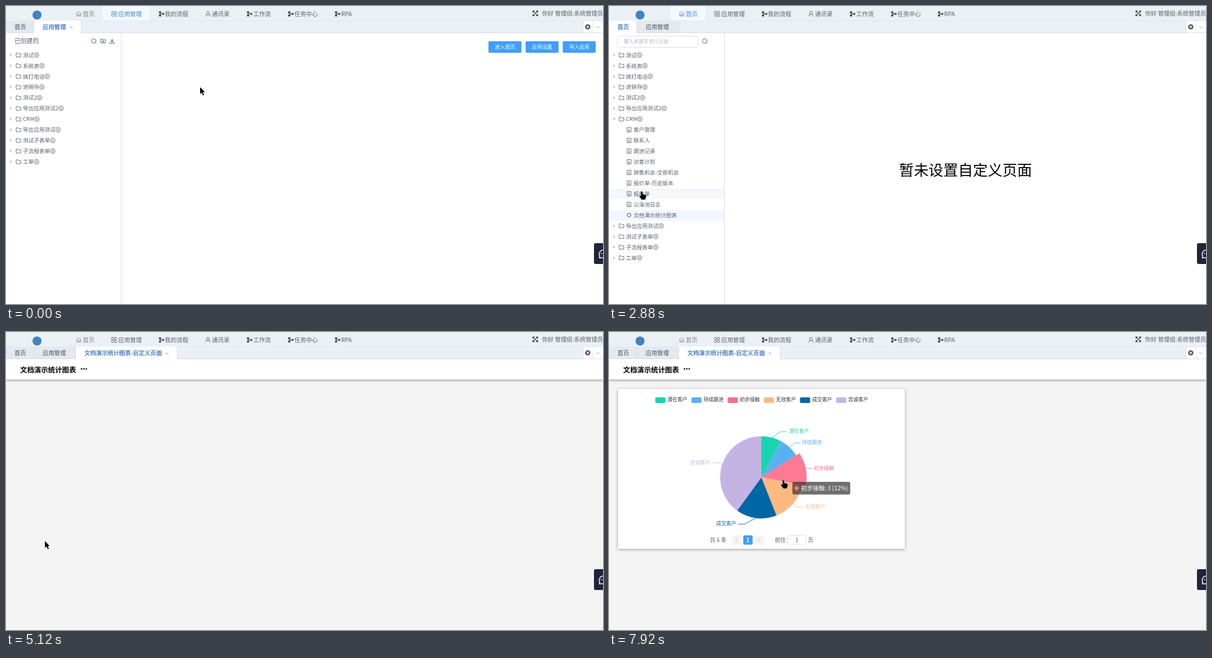
An HTML page with a canvas for the animation above (8 s loop, 1058x529 px).

```html
<!DOCTYPE html>
<html lang="zh">
<head>
<meta charset="utf-8">
<style>
html, body { margin: 0; width: 100%; height: 100%; overflow: hidden; }
canvas { display: block; }
</style>
</head>
<body>
<canvas width="1058" height="529"></canvas>
<script>
const ctx = document.querySelector('canvas').getContext('2d');
const LOOP = 8000, TAB_CLICK = 1510, HOME = 1810, BLANK = 4800, PAGE = 5000, CHART = 5240, TIP = 6380;
const BLUE = '#3a84f0', GREY = '#5c6068', BAR = '#ebf0f7', EDGE = '#d5dbe4', PRIMARY = '#409eff';

const ICON = {
  home: 'M-4.5 0L0-4.2 4.5 0M-3.3-.8V4h2.2V1.2h2.2V4h2.2V-.8',
  apps: [[-2.6, -2.6], [2.6, -2.6], [-2.6, 2.6], [2.6, 2.6]].map(([x, y]) => ring(x, y, 2.1)).join(''),
  flow: 'M-4.5-4.5h4v3.2h-4zM-4.5 1.3h4v3.2h-4zM1-1.6h4v3.2h-4zM-3-1.5h1v3h-1zM-2-.5h3v1h-3z',
  user: ring(0, -1.8, 2.6) + 'M-4.2 4.5q.2-3.8 4.2-3.8t4.2 3.8',
  folder: 'M-4-3.5h3l1.2 1.3h4v5.7h-8.2z',
  gear: 'M-2.3-4h4.6l2.3 4-2.3 4h-4.6l-2.3-4z' + ring(0, 0, 2),
  doc: 'M-3.5-4h7v8h-7zM-1.5-1.5h2M-1.5.5h3M-1.5 2.3h3',
  chip: 'M-2.8-2.8h5.6v5.6h-5.6zM-4.2 0h1.4M2.8 0h1.4M0-4.2v1.4M0 2.8v1.4',
  search: ring(0, 0, 4) + 'M2.8 2.8l1.8 1.8',
  plus: 'M-2 .8h4M0-1.2v4',
  download: 'M0-4.5v6M-2.5-1L0 1.5 2.5-1M-4 2v2h8v-2',
  expand: 'M-4-4L4 4M4-4L-4 4M-4.2-1.5v-2.7h2.7M4.2-1.5v-2.7h-2.7M-4.2 1.5v2.7h2.7M4.2 1.5v2.7h-2.7',
  cross: 'M-2-2l4 4M2-2l-4 4',
  right: 'M-1.5-3l3.3 3-3.3 3z',
  down: 'M-3-1.5l3 3.3 3-3.3z',
  arrow: 'M0 0V12.2L2.8 9.6 5 14.6 7 13.7 4.9 8.9H8.4Z',
  hand: 'M-1.5 1Q0-1 1.5 1V5l4.5 1q2 .5 1.8 2.5l-.6 3-1.2 3.3h-6.5l-1-2-2.6-3.6q-.8-2 .8-2l1.8 1.3z'
};

const menu = [
  ['home', 129, 136, '首页'], ['apps', 191.5, 199, '应用管理'], ['flow', 275.5, 281.5, '我的流程'],
  ['user', 358, 365, '通讯录'], ['flow', 431.5, 438, '工作流'], ['flow', 504.5, 511, '任务中心'], ['flow', 587.5, 594, 'RPA']
];
const apps = ['测试', '系统表', '拨打电话', '进销存', '测试2', '导出应用测试2', 'CRM', '导出应用测试', '测试子表单', '子流程表单', '工单'];
const crmPages = ['客户管理', '联系人', '跟进记录', '访客计划', '销售机会-全部机会', '报价单-历史版本', '报价单', '公海池日志', '文档演示统计图表'];

// name, value, colour, label line, label x
const slices = [
  ['潜在客户', 2, '#19d4ae', 'M288 188L304 177H315', 319],
  ['持续跟进', 2, '#5ab1ef', 'M320 205L328 197H339', 342],
  ['初步接触', 3, '#fa6e86', 'M341 244.5L349 242H360', 363],
  ['无效客户', 4, '#ffb980', 'M326 304L334 311H345', 348],
  ['成交客户', 4, '#0067a6', 'M261 330L240 341H229', 190],
  ['忠诚客户', 10, '#c4b4e4', 'M201 235.5L194 232H183', 144]
];
const labelY = [176, 196, 242, 310, 340, 232];
const TOTAL = 25, CX = 270, CY = 258, R = 73, TAU = Math.PI * 2;

// time, x, y of the pointer tip
const track = [
  [430, 344, 144], [1210, 18, 43], [1300, 20, 42], [1850, 20, 42], [2610, 72, 350], [2880, 58, 329],
  [3150, 130, 280], [3420, 72, 212], [3500, 71, 202], [3800, 71, 202], [4410, 69, 371], [5810, 69, 371],
  [6450, 228, 241], [6520, 228, 241], [6860, 262, 224], [6950, 262, 224], [7310, 295, 225], [7570, 309, 263]
];

function ring(x, y, r) {
  return `M${x + r} ${y}a${r} ${r} 0 1 1 ${-2 * r} 0a${r} ${r} 0 1 1 ${2 * r} 0`;
}
function ramp(t, from, to) {
  return Math.min(1, Math.max(0, (t - from) / (to - from)));
}
function pointerAt(t) {
  const i = track.findIndex(k => k[0] > t);
  if (i === 0) return track[0].slice(1);
  if (i < 0) return track[track.length - 1].slice(1);
  const [t0, x0, y0] = track[i - 1], [t1, x1, y1] = track[i];
  let k = ramp(t, t0, t1);
  k = k * k * (3 - 2 * k);
  return [x0 + (x1 - x0) * k, y0 + (y1 - y0) * k];
}
function sliceAt(t) {
  const [x, y] = pointerAt(t), dx = x - CX, dy = y - CY;
  if (t < CHART || Math.hypot(dx, dy) > R) return -1;
  let rest = (Math.atan2(dx, -dy) / TAU + 1) % 1 * TOTAL;
  return slices.findIndex(s => (rest -= s[1]) < 0);
}

function rect(x, y, w, h, color) {
  ctx.fillStyle = color;
  ctx.fillRect(x, y, w, h);
}
function box(x, y, w, h, r, fill, stroke) {
  ctx.beginPath();
  ctx.roundRect(x, y, w, h, r);
  if (fill) { ctx.fillStyle = fill; ctx.fill(); }
  if (stroke) { ctx.strokeStyle = stroke; ctx.lineWidth = 1; ctx.stroke(); }
}
function text(s, x, y, size, color = GREY, align = 'left', weight = 400) {
  ctx.font = `${weight} ${size}px "Noto Sans CJK SC", "Noto Sans CJK", sans-serif`;
  ctx.textAlign = align;
  ctx.fillStyle = color;
  ctx.fillText(s, x, y + size * .38);
  return ctx.measureText(s).width;
}
function shape(d, x, y, stroke, fill, width = .9) {
  const path = new Path2D(d);
  ctx.save();
  ctx.translate(x, y);
  ctx.lineWidth = width;
  if (stroke) { ctx.strokeStyle = stroke; ctx.stroke(path); }
  if (fill) { ctx.fillStyle = fill; ctx.fill(path); }
  ctx.restore();
}
function shadowed(blur, dy, draw) {
  ctx.save();
  ctx.shadowColor = 'rgba(0,0,0,.4)';
  ctx.shadowBlur = blur;
  ctx.shadowOffsetY = dy;
  draw();
  ctx.restore();
}
function faded(alpha, draw) {
  ctx.save();
  ctx.globalAlpha = alpha;
  draw();
  ctx.restore();
}

function drawTab(x, w, label, on, blue, cross) {
  rect(x, 26, w, 21, '#e4e9ef');
  faded(on, () => rect(x, 26, w, 22, '#fff'));
  rect(x + w - 1, 26, 1, 22, EDGE);
  text(label, x + 15, 37, 10.3, '#495060');
  faded(blue, () => text(label, x + 15, 37, 10.3, BLUE));
  if (cross > 0) faded(cross, () => shape(ICON.cross, x + w - 18.5, 38, '#6ba0ee', null, .8));
}

function drawHeader(t) {
  rect(0, 0, 1058, 48, BAR);
  shape(ring(0, 0, 8), 55, 16, null, '#4284bf');
  const active = t < HOME ? 1 : t < BLANK ? 0 : -1;
  if (active === 1) rect(171, 0, 84, 26, '#f5f8fc');
  if (active === 0) rect(109, 0, 62, 26, '#f5f8fc');
  menu.forEach(([icon, ix, x, label], i) => {
    const color = i === active ? BLUE : i ? GREY : '#7d8188';
    const solid = icon === 'flow';
    shape(ICON[icon], ix, 14, solid ? null : color, solid ? '#484c54' : null);
    text(label, x, 14, 10.4, color);
  });
  shape(ICON.expand, 938, 13, '#484c54', null, 1.4);
  text('你好 管理组:系统管理员', 950, 13, 10.3);

  rect(0, 26, 1058, 1, '#e3e8ef');
  rect(0, 47, 1058, 1, EDGE);
  const page = t >= PAGE;
  const bg = ramp(t, TAB_CLICK, 1700), blue = ramp(t, HOME + 20, 2080);
  drawTab(0, 50, '首页', page ? 0 : bg, page ? 0 : blue, 0);
  drawTab(50, 84 - 10 * blue, '应用管理', 1 - bg, 1 - blue, 1 - blue);
  if (page) drawTab(124, 180, '文档演示统计图表-自定义页面', 1, 1, 1);

  rect(1022, 27, 36, 20, '#fff');
  rect(1022, 27, 1, 20, EDGE);
  rect(1040, 27, 1, 20, '#e3e7ed');
  shape(ring(0, 0, 4.6), 1031, 37, null, '#484c54');
  shape(ICON.cross, 1031, 37, '#fff', null, 1.2);
  shape('M-3-1.5l3 3 3-3', 1049, 37.5, '#9a9ea6');
}

function drawTree(t) {
  const home = t >= HOME, [px, py] = pointerAt(t);
  const rows = apps.flatMap(name => home && name === 'CRM' ? [[name], ...crmPages.map(p => [p, true])] : [[name]]);
  let hover = px < 204 ? Math.floor((py - 77.5) / 18.95) : -1;
  if (hover >= rows.length) hover = -1;
  rows.forEach(([name, child], i) => {
    const y = 87 + 18.95 * i, last = name === crmPages[8];
    if (last) rect(0, Math.round(y - 9.5), 204, 19, '#f0f7ff');
    else if (i === hover) rect(0, Math.round(y - 9.5), 204, 19, '#f5f7fa');
    if (child) {
      shape(last ? ICON.chip : ICON.doc, 35.5, y, GREY);
      text(name, 43.5, y, 9.6);
    } else {
      shape(home && name === 'CRM' ? ICON.down : ICON.right, 9, y, null, '#b9bec8');
      shape(ICON.folder, 22, y, GREY);
      const w = text(name, 30, y, 9.6);
      shape(ICON.gear, 34.8 + w, y, GREY, null, .8);
    }
  });
  return hover;
}

function drawManager(t) {
  rect(0, 48, 1058, 481, '#fff');
  rect(204, 48, 1, 481, '#d9dde3');
  if (t < HOME) {
    text('已创建的', 15, 62, 10.8);
    shape(ICON.search, 155.5, 62, GREY, null, 1);
    shape(ICON.folder, 172, 62, GREY, null, 1);
    shape(ICON.plus, 172, 62, GREY, null, 1);
    shape(ICON.download, 188, 62.5, GREY, null, 1.1);
    ['进入首页', '应用设置', '导入应用'].forEach((label, i) => {
      const x = 855 + 65.8 * i;
      box(x, 62.5, 58.5, 20.5, 2, PRIMARY);
      text(label, x + 29.3, 72.5, 9, '#fff', 'center');
    });
  } else {
    box(14.5, 53.5, 143, 20, 3, '#fff', '#dcdfe6');
    text('输入关键字进行过滤', 26, 63, 8.8, '#b4b8c0');
    shape(ICON.search, 169.5, 62, GREY, null, 1);
    text('暂未设置自定义页面', 514, 291, 26.2, '#000');
  }
  return drawTree(t);
}

function lighten(hex) {
  const channels = hex.match(/\w\w/g).map(c => Math.min(255, Math.round(parseInt(c, 16) * 1.1)));
  return `rgb(${channels})`;
}

function drawPie(t, hovered) {
  const k = ramp(t, CHART, CHART + 1000), sweep = 1 - (1 - k) ** 3;
  slices.forEach(([name, , color, line, x], i) => {
    shape(line, 0, 0, color);
    text(name, x, labelY[i], 8.9, color);
  });
  let start = 0;
  slices.forEach(([, value, color], i) => {
    const end = Math.min(start + value / TOTAL, sweep);
    // the raised radius eases over the last moments of hovering
    const lift = [0, 40, 80, 120].filter(d => sliceAt(t - d) === i).length / 4;
    if (end > start) {
      ctx.beginPath();
      ctx.moveTo(CX, CY);
      ctx.arc(CX, CY, R + 7 * lift, start * TAU - TAU / 4, end * TAU - TAU / 4);
      ctx.fillStyle = i === hovered ? lighten(color) : color;
      ctx.fill();
    }
    start += value / TOTAL;
  });
}

function drawPager() {
  text('共 6 条', 179, 369, 9.7);
  [[218, 1], [258.5, -1]].forEach(([x, dir]) => {
    box(x, 361, 16.5, 16.5, 1.5, '#f4f4f5');
    shape(`M${1.5 * dir}-3L${-1.5 * dir} 0 ${1.5 * dir} 3`, x + 8, 369.2, '#b4b8c0');
  });
  box(238, 361, 16.5, 16.5, 1.5, PRIMARY);
  text('1', 246.2, 369.2, 9.7, '#fff', 'center', 700);
  text('前往', 294, 369, 9.7);
  box(316.5, 361.5, 33, 15.5, 2, '#fff', '#dcdfe6');
  text('1', 333, 369.2, 9.7, GREY, 'center');
  text('页', 352.5, 369, 9.7);
}

function drawTooltip(t, hovered) {
  const [x, y] = pointerAt(Math.max(TIP, t - 350)).map((v, i) => v + [16, 3][i]);
  const [name, value, color] = slices[hovered];
  const label = `${name}: ${value} (${value * 100 / TOTAL}%)`;
  ctx.font = '400 10.4px "Noto Sans CJK SC", "Noto Sans CJK", sans-serif';
  box(x, y, ctx.measureText(label).width + 19.5, 22.5, 3, 'rgba(50,50,50,.7)');
  shape(ring(0, 0, 3.7), x + 7.5, y + 11.3, null, color);
  text(label, x + 15.5, y + 11.3, 10.4, '#fff');
}

function drawPage(t, hovered) {
  rect(0, 48, 1058, 481, '#f4f4f4');
  shadowed(4, 1.5, () => rect(0, 48, 1058, 36.5, '#fff'));
  text('文档演示统计图表', 25, 67.5, 12.4, '#000', 'left', 700);
  [133.8, 138, 142.2].forEach(x => shape(ring(0, 0, 1.4), x, 65.5, null, '#222'));
  if (t < CHART) return;
  shadowed(5, 1, () => box(16, 101, 508.5, 284, 1, '#fff'));
  slices.forEach(([name, , color], i) => {
    const x = 82 + 64.1 * i;
    box(x, 116, 18, 10, 2.5, color);
    text(name, x + 21.5, 120, 8.9, '#333');
  });
  drawPie(t, hovered);
  drawPager();
  if (hovered >= 0 && t >= TIP) drawTooltip(t, hovered);
}

function drawChatButton() {
  box(1042, 421, 20, 37, 3, '#23243a');
  shape('M6 5.3A7 7 0 1 0-5.2 4.7L-6 7.5H2', 1057.5, 439.5, '#fff', null, 1.5);
  shape(ring(-2.5, 0, 1) + ring(1, 0, 1), 1057.5, 439.5, null, '#fff');
}

function frame(now) {
  const t = now % LOOP, [x, y] = pointerAt(t), hovered = sliceAt(t);
  let row = -1;
  ctx.clearRect(0, 0, 1058, 529);
  if (t < BLANK) row = drawManager(t);
  else if (t < PAGE) rect(0, 48, 1058, 481, BAR);
  else drawPage(t, hovered);
  drawHeader(t);
  drawChatButton();
  const hand = row >= 0 || hovered >= 0 || (t >= 1300 && y < 48);
  shape(hand ? ICON.hand : ICON.arrow, x, y, '#fff', '#000', 1);
  requestAnimationFrame(frame);
}
requestAnimationFrame(frame);
</script>
</body>
</html>
```
